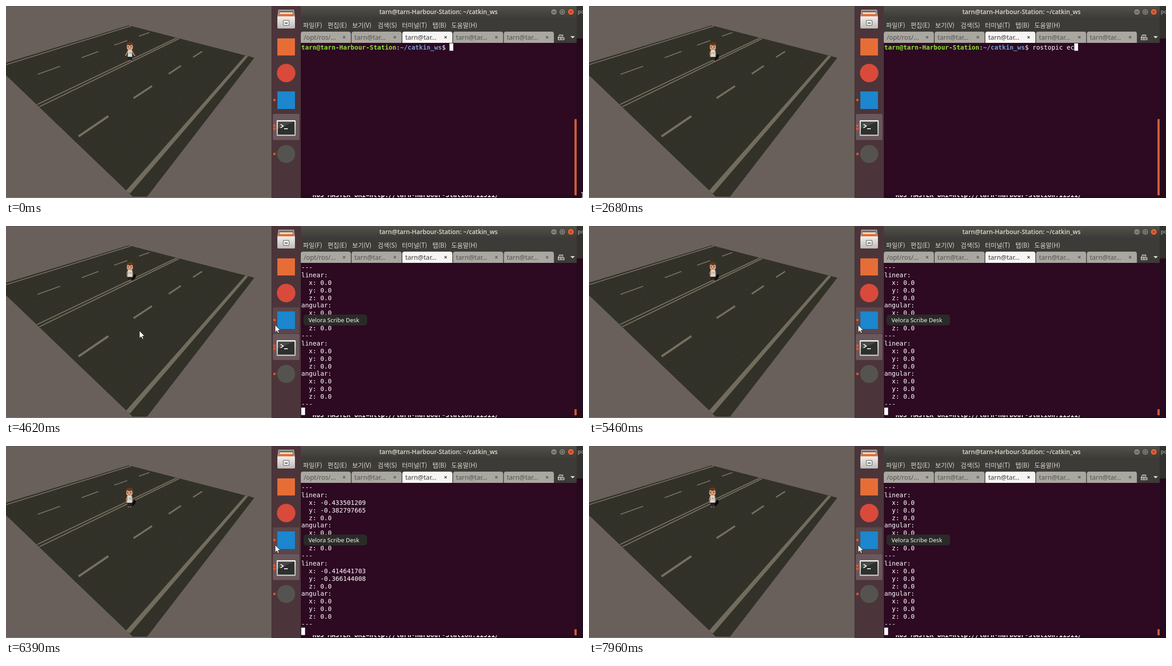
Write an HTML page that moves like this. It is 1280 by 427 pixels and loops after 8000 ms.

```html
<!DOCTYPE html>
<html lang="ko">
<head>
<meta charset="utf-8">
<title>Road simulation and terminal</title>
<style>
  html, body { margin: 0; width: 100%; height: 100%; overflow: hidden; background: #69605c; }
  svg { display: block; width: 1280px; height: 427px; }
  text { white-space: pre; }
  .mono { font: 14px "DejaVu Sans Mono", monospace; fill: #fff; }
  .ui { font: 14.3px "Noto Sans", "Open Sans", sans-serif; }
  .title { font: 600 13.6px "Open Sans", "Noto Sans", sans-serif; fill: #dfdbd2; }
  .menu { font: 13.8px "Noto Sans CJK KR", "Noto Sans CJK", sans-serif; fill: #dfdbd2; }
  .bold { font-weight: 700; }
  .paint { stroke: #756f60; fill: none; }
</style>
</head>
<body>
<svg viewBox="0 0 1280 427" xmlns="http://www.w3.org/2000/svg">
  <defs>
    <linearGradient id="titleBar" x2="0" y2="1">
      <stop stop-color="#53514b"/><stop offset="1" stop-color="#3c3b37"/>
    </linearGradient>
    <linearGradient id="metal" x2="0" y2="1">
      <stop stop-color="#f0efec"/><stop offset="1" stop-color="#bdbbb7"/>
    </linearGradient>
    <clipPath id="roadShape"><path d="M272 43L551 115L313 424H281L0 154V126Z"/></clipPath>
    <filter id="asphalt" x="0" y="0" width="1" height="1" color-interpolation-filters="sRGB">
      <feTurbulence type="fractalNoise" baseFrequency=".55" numOctaves="2" seed="4"/>
      <feColorMatrix values="0 0 0 0 .38  0 0 0 0 .36  0 0 0 0 .29  .5 0 0 0 -.21"/>
    </filter>
    <path id="arrow" d="M0 0V16.5L3.8 13L6.4 18.6L9 17.4L6.5 12H11.6Z" fill="#fff" stroke="#222"/>
  </defs>

  <rect width="590" height="427" fill="#69605c"/>
  <path d="M0 .5H589" stroke="#5b5450"/>
  <path d="M0 426.5H589" stroke="#85807b"/>
  <g clip-path="url(#roadShape)">
    <rect width="560" height="427" fill="#302f27"/>
    <rect width="560" height="427" filter="url(#asphalt)"/>
  </g>
  <g class="paint">
    <path d="M277 44.5L0 130.5" stroke-width="2"/>
    <path d="M70 152L120 134M168 115L205 101M240 87L269 77M295 67L318 59" stroke-width="2"/>
    <path d="M379 71L69 219M384 72.5L74 224" stroke-width="2.3"/>
    <path d="M161 290L227 245" stroke-width="5"/>
    <path d="M283 205L324 178" stroke-width="4"/>
    <path d="M361 151L388 133" stroke-width="3.5"/>
    <path d="M415 114L435 101" stroke-width="3"/>
  </g>
  <path d="M531 110L537 112L275 417L266 411Z" fill="#716c5d"/>

  <g id="walker">
    <path id="shadow" d="M4 33L11 27L14 29L13 35L5 42Z" fill="#0b0b09"/>
    <path d="M-4.500 31H6L5.500 41H2L.5 36L-1 41H-3.500Z" fill="#20232f"/>
    <path d="M-3 41H-.5V43.500H-3ZM2 41H4.500V43.500H2Z" fill="#a5714f"/>
    <g id="torso">
      <path id="arms" fill="none" stroke="#c9916b" stroke-width="2.200" stroke-linecap="round"/>
      <path d="M-3.500 17H4.500L5.500 33H-4.500Z" fill="#ddd9cd"/>
      <path d="M-1 22H3V26H-1Z" fill="#9fb0ba"/>
      <rect x="-6.500" y="3" width="13.500" height="15" rx="5" fill="#d6a17c"/>
      <path d="M-7 10Q-9 2 -2 .5Q5 -1.500 7.500 4V10L5 6L1 8L-5 6Z" fill="#62371f"/>
      <path d="M-3.500 9.500V12M3 9.500V12" stroke="#30211b" stroke-width="1.600"/>
      <path d="M-2 15H2" stroke="#8d4e3a"/>
    </g>
  </g>

  <rect x="589" width="65" height="427" fill="#4b353a"/>
  <path d="M589.500 0V427" stroke="#403235"/>
  <rect id="hover" x="592" y="181" width="59" height="58" rx="3" fill="#5a474c"/>
  <rect x="592" y="240" width="59" height="58" rx="3" fill="#6a575b"/>
  <g id="dots" fill="#e95420"></g>
  <path d="M604 8H639L641 24H602Z" fill="#9c9a96"/>
  <path d="M606 11H637V24H606Z" fill="#6a6863"/>
  <path d="M607 14H636V18H607Z" fill="#f4d6bd"/>
  <path d="M605 18H638V24H605Z" fill="#e56a32"/>
  <rect x="602" y="23" width="39" height="27" rx="2" fill="url(#metal)"/>
  <rect x="615" y="32" width="13" height="11" rx="2" fill="#f5f4f2" stroke="#777571" stroke-width="1.500"/>
  <path d="M618 38H625" stroke="#666" stroke-width="2.500"/>
  <rect x="602" y="72" width="39" height="38" fill="#e76d36"/>
  <circle cx="621.500" cy="149" r="20.500" fill="#d94a3b"/>
  <rect x="602" y="190" width="39" height="39" fill="#1c86ce"/>
  <rect x="600.500" y="254" width="42" height="35" rx="1.500" fill="url(#metal)"/>
  <rect x="603" y="257" width="37" height="29" fill="#2d302e"/>
  <path d="M603 257H640L603 273Z" fill="#474a48"/>
  <path d="M609 263L615 267L609 271M617 273H625" fill="none" stroke="#fff" stroke-width="2"/>
  <circle cx="621.500" cy="329" r="20" fill="#55534f"/>

  <rect x="1266" width="14" height="72" fill="#33322e"/>
  <text class="ui bold" x="1268" y="17" fill="#8b8982" style="font-size:12px">po</text>
  <path d="M1266 72H1280V427H654V421H1266Z" fill="#260a1d"/>
  <text class="mono bold" x="680" y="425">ROS_MASTER_URI=http://tarn-Harbour-Station:11311/</text>
  <rect x="654" width="612" height="82" fill="#3c3b37"/>
  <rect x="654" width="612" height="27" fill="url(#titleBar)"/>
  <text class="title" x="959.500" y="18" text-anchor="middle">tarn@tarn-Harbour-Station: ~/catkin_ws</text>
  <g stroke="#35342f">
    <circle cx="1215.500" cy="13" r="7" fill="#82807a"/><circle cx="1234" cy="13" r="7" fill="#82807a"/>
    <circle cx="1253" cy="13" r="7" fill="#f0622f"/>
    <path d="M1212 13.500H1219M1231 10H1237V16H1231ZM1250 10L1256 16M1256 10L1250 16" fill="none"/>
  </g>
  <g id="menus" class="menu"></g>
  <g id="tabs"></g>
  <path d="M1227 64.500H1235V70M1225 68V75H1238V70M1225 71H1238M1231 66V74M1227 64.500V70" fill="none" stroke="#dfdbd2" stroke-width="1.400"/>
  <path d="M1252 67H1262L1257 72Z" fill="#dfdbd2"/>

  <rect x="654" y="82" width="612" height="339" fill="#2d0922"/>
  <text id="prompt" class="mono" x="655" y="97"><tspan class="bold" fill="#8ae234">tarn@tarn-Harbour-Station</tspan>:<tspan class="bold" fill="#729fcf">~/catkin_ws</tspan>$ <tspan id="command"></tspan></text>
  <g id="screen" class="mono"></g>
  <rect id="caret" width="8.400" height="16.500" fill="#fff"/>
  <rect id="thumb" x="1261" width="5" fill="#cd5b39"/>

  <g id="tooltip">
    <rect x="660" y="197" width="141" height="24" rx="6" fill="#2b2d28" opacity=".93"/>
    <text class="ui" x="671" y="214" fill="#f4f3f0" style="font-size:13px">Velora Scribe Desk</text>
  </g>
  <use id="restingArrow" href="#arrow" x="597" y="220"/>
  <use id="movingArrow" href="#arrow" x="296" y="233"/>
  <path id="beam" d="M-3 -6H-1L0 -5L1 -6H3M0 -5V5M-3 6H-1L0 5L1 6H3" fill="none" stroke="#e8e4e6" stroke-width="1.300"/>
</svg>
<script>
const $ = id => document.getElementById(id);
const LOOP = 8000, CHAR = 8.43, ROW = 16.89;
const COMMAND = "rostopic echo /cmd_vel";
const MESSAGE_MS = 20, FIRST_MESSAGE = 3520;

// Screen refresh times: [time, number of refreshes until the next time].
const REFRESH = [[1000, 6], [1780, 2], [2020, 1], [2170, 7], [3110, 1], [3260, 2], [3560, 5],
  [4220, 1], [4370, 2], [4620, 5], [5310, 1], [5460, 4], [6000, 3], [6390, 1], [6540, 2],
  [6850, 5], [7540, 1], [7690, 2], [7960, 1]];
const refreshTimes = [0];
REFRESH.forEach(([start, count], i) => {
  const end = i + 1 < REFRESH.length ? REFRESH[i + 1][0] : LOOP;
  for (let k = 0; k < count; k++) refreshTimes.push(Math.round(start + (end - start) * k / count));
});

const clamp = v => Math.max(0, Math.min(1, v));
const progress = (t, from, to) => clamp((t - from) / (to - from));
const smooth = v => v * v * (3 - 2 * v);
const mix = (a, b, p) => a + (b - a) * p;
const show = (id, on) => $(id).setAttribute("display", on ? "inline" : "none");
const place = (id, x, y, scale = 1) =>
  $(id).setAttribute("transform", `translate(${x} ${y}) scale(${scale})`);

$("dots").innerHTML = [209, 266, 273, 329]
  .map(y => `<circle cx="595.5" cy="${y}" r="2.7"/>`).join("");
$("menus").innerHTML = [["파일(F)", 659], ["편집(E)", 713.5], ["보기(V)", 768], ["검색(S)", 824.5],
  ["터미널(T)", 878.5], ["탭(B)", 946], ["도움말(H)", 988]]
  .map(([label, x]) => `<text x="${x}" y="47.5">${label}</text>`).join("");
$("tabs").innerHTML = Array.from({ length: 5 }, (_, i) => {
  const x = 654 + i * 112.6, active = i === 2, ink = active ? "#3c3c3a" : "#55534f";
  return `<path d="M${x} 82V62Q${x} 57 ${x + 5} 57H${x + 106}Q${x + 111} 57 ${x + 111} 62V82Z"
      fill="${active ? "#f6f5f3" : "#aaa7a1"}"/>
    <text class="ui" x="${x + 6.5}" y="75" fill="${ink}">${i ? "tarn@tar..." : "/opt/ros/..."}</text>
    <path d="M${x + 93.5} 67l5 5m0 -5l-5 5" stroke="${ink}" stroke-width="1.4"/>`;
}).join("");
$("screen").innerHTML = Array.from({ length: 19 }, (_, i) =>
  `<text x="655" y="${97 + ROW * i}"></text>`).join("");
const rows = [...$("screen").children];

// Speed ramps up while the key is held, then falls back at the same rate.
function speed(time, atSixSeconds, previous, last) {
  const slope = (atSixSeconds - previous) / MESSAGE_MS;
  const rising = atSixSeconds + (time - 6000) * slope;
  const falling = last + (6830 - time) * slope;
  const moving = rising < 0 && time <= 6830;
  return moving ? Math.max(rising, falling) : 0;
}
const format = v => v ? String(Number(v.toPrecision(9))) : "0.0";

function message(time) {
  const x = speed(time, -0.489690453, -0.470830947, 0.000267428521);
  const y = speed(time, -0.43244043, -0.415786773, 0.000236445936);
  return ["linear:", `  x: ${format(x)}`, `  y: ${format(y)}`, "  z: 0.0",
    "angular:", "  x: 0.0", "  y: 0.0", "  z: 0.0", "---"];
}

function drawTerminal(t) {
  const received = Math.max(0, Math.floor((t - FIRST_MESSAGE) / MESSAGE_MS));
  const scrolled = received > 2;
  const typed = t < 2170 ? 0 : Math.ceil(COMMAND.length * progress(t, 2040, 3110));
  $("command").textContent = COMMAND.slice(0, typed);
  show("prompt", !scrolled);

  const lines = [scrolled ? "---" : ""];
  if (received > 1) lines.push(...message(t - MESSAGE_MS));
  if (received > 0) lines.push(...message(t));
  rows.forEach((row, i) => { row.textContent = lines[i] || ""; });

  const entered = t >= 3260;
  place("caret", entered ? 655 : 655 + CHAR * (39 + typed),
    83 + (entered ? ROW * lines.length : 0));

  const history = 40 + 9 * Math.max(0, received - 2);
  const height = Math.max(13.5, 339 * 20 / history);
  $("thumb").setAttribute("y", 421 - height);
  $("thumb").setAttribute("height", height);
}

function drawWalker(t) {
  const idle = t >= 1000;
  const walk = smooth(progress(t, 5430, 5980));
  place("walker", mix(274.5, 273.5, walk), mix(80, 92, walk), mix(1, 1.03, walk));
  place("torso", 0, idle ? 0.3 * Math.sin(t / 320) : 0);
  $("arms").setAttribute("d", idle ? "M-4 19L-6 25L-5 32M5 19L6 25L6 32"
    : "M-4 20L-7 26L-9 30M5 20L8 26L11 30");
  show("shadow", idle);
}

function drawPointer(t) {
  const hovered = t >= 4490;
  ["hover", "tooltip", "restingArrow"].forEach(id => show(id, hovered));
  show("movingArrow", t >= 4620 && t < 4880);
  const leaving = t >= 4370 && t < 4490;
  show("beam", t < 2170 || leaving);
  const p = smooth(progress(t, 1000, 1780));
  place("beam", leaving ? 850 : mix(1279, 1033, p), leaving ? 228 : mix(421, 232, p));
}

function render(time) {
  const t = refreshTimes.filter(start => start <= time).pop();
  drawTerminal(t);
  drawWalker(t);
  drawPointer(t);
}

function tick() {
  render(performance.now() % LOOP);
  requestAnimationFrame(tick);
}
tick();
</script>
</body>
</html>
```
